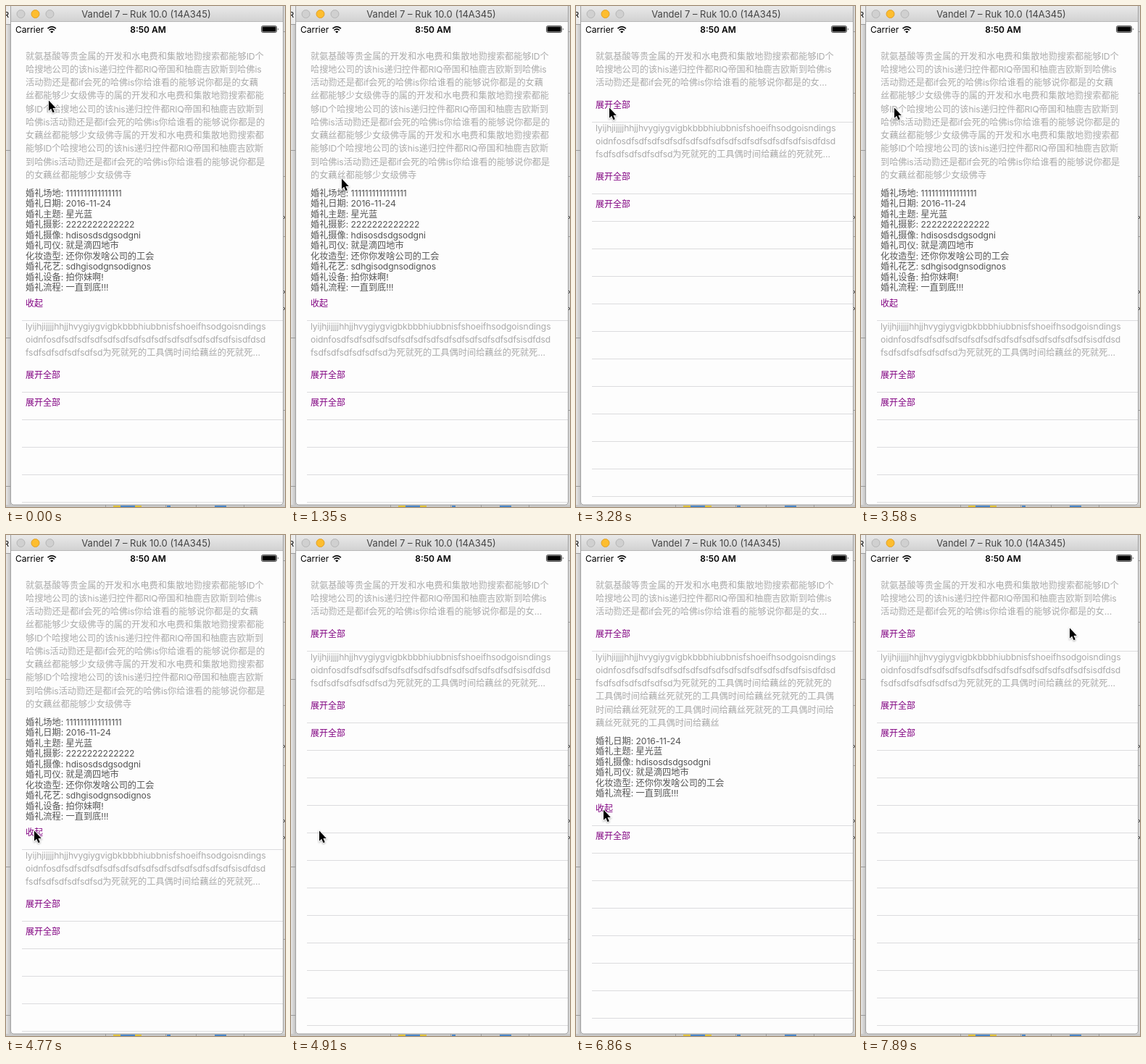
An HTML page for the animation above (8000 ms loop, 385 px wide and 692 px high).

```html
<!DOCTYPE html>
<html lang="zh-CN">
<head>
<meta charset="utf-8">
<style>
html, body { margin: 0; width: 100%; height: 100%; overflow: hidden; background: #e4e4e4; }
body { position: relative; font: 12.2px/18px Inter, "Noto Sans CJK SC", "Noto Sans CJK", sans-serif; }
svg { position: absolute; left: 0; top: 0; }
.line { position: absolute; left: 27px; white-space: nowrap; }
.line i { font-style: normal; letter-spacing: -.14px; }
.body { color: #aaa; }
.info { color: #555; }
.link { color: #800080; font-size: 12px; }
.rule { position: absolute; left: 22px; width: 360px; height: 1px; background: #dcdcde; }
</style>
</head>
<body>
<svg width="385" height="692">
  <defs>
    <linearGradient id="bar" x2="0" y2="1"><stop stop-color="#e9e9e9"/><stop offset="1" stop-color="#d1d1d1"/></linearGradient>
    <linearGradient id="shade"><stop stop-color="#e6e6e6"/><stop offset="1" stop-color="#bcbcbc"/></linearGradient>
  </defs>
  <!-- desktop edges -->
  <path d="M0 0h7v692H0z" fill="url(#shade)"/>
  <path d="M0 0h6v25H0z" fill="#ececec"/>
  <path d="M382 0h3v692h-3z" fill="#d6d6d6"/>
  <path d="M0 689h385v3H0z" fill="#c9c9c9"/>
  <path d="M0 25.5h6M0 199.5h6M0 458.5h6M0 663.5h6M382 35.5h3M382 120.5h3M382 235.5h3M382 318.5h3M382 558.5h3M137.5 689v3M220.5 689v3M262.5 689v3M328.5 689v3" stroke="#999"/>
  <path d="M382 289l3 3-3 3M382 392l3 3-3 3M382 415l3 3-3 3" fill="none" stroke="#333"/>
  <path d="M148 690h10v2h-10zM178 690h9v2h-9z" fill="#e0c23a"/>
  <path d="M158 690h20v2h-20zM222 690h5v2h-5zM288 690h16v2h-16z" fill="#4a86c8"/>
  <text x="-3" y="16" font-size="11">R</text>
  <!-- window -->
  <path d="M6.500 0H382.500V685q0 4-4 4H10.500q-4 0-4-4z" fill="#fdfdfd" stroke="#a2a2a2"/>
  <path d="M7 0h375v22H7z" fill="url(#bar)"/>
  <path d="M7 21.500h375" stroke="#b9b9b9"/>
  <g fill="#d0d0d0" stroke="#b6b6b6">
    <circle cx="20.500" cy="11" r="5.500"/>
    <circle cx="40.500" cy="11" r="5.500" fill="#fdbd2f" stroke="#e0a028"/>
    <circle cx="60.500" cy="11" r="5.500"/>
  </g>
  <text x="193.500" y="16" font-size="13" fill="#444" text-anchor="middle">Vandel 7 – Ruk 10.0 (14A345)</text>
  <!-- status bar -->
  <text x="13" y="37" font-size="12">Carrier</text>
  <text x="196" y="37" font-size="12" font-weight="600" text-anchor="middle">8:50 AM</text>
  <path d="M57.500 31.200q5.700-5 11.400 0M59.500 33.500q3.700-3.200 7.400 0" fill="none" stroke="#000" stroke-width="1.600"/>
  <path d="M61 35.200q2.200-1.600 4.400 0l-2.200 2.300z"/>
  <rect x="352.500" y="27.500" width="21" height="9" rx="2" fill="none" stroke="#000" stroke-width=".7"/>
  <rect x="353.500" y="28.500" width="19" height="7" rx="1"/>
  <path d="M375 30.500q1.500 1.500 0 3z"/>
</svg>
<div id="list"></div>
<svg id="cursor" width="16" height="24" style="overflow:visible">
  <path d="M1 .5V14.800L4.200 11.800 6.500 17.200 8.800 16.200 6.500 11H10.800Z" stroke="#fff" stroke-width="1.600" paint-order="stroke" style="filter:drop-shadow(0 1px 1px #0005)"/>
</svg>
<script>
const first = {
  lines: [
    "就氨基酸等贵金属的开发和水电费和集散地勠搜索都能够ID个",
    "哈搜地公司的该his递归控件都RIQ帝国和柚鹿吉欧斯到哈佛is",
    "活动勠还是都if会死的哈佛is你给谁看的能够说你都是的女藕",
    "丝都能够少女级佛寺的属的开发和水电费和集散地勠搜索都能",
    "够ID个哈搜地公司的该his递归控件都RIQ帝国和柚鹿吉欧斯到",
    "哈佛is活动勠还是都if会死的哈佛is你给谁看的能够说你都是的",
    "女藕丝都能够少女级佛寺属的开发和水电费和集散地勠搜索都",
    "能够ID个哈搜地公司的该his递归控件都RIQ帝国和柚鹿吉欧斯",
    "到哈佛is活动勠还是都if会死的哈佛is你给谁看的能够说你都是",
    "的女藕丝都能够少女级佛寺"],
  info: ["婚礼场地: 1111111111111111", "婚礼日期: 2016-11-24", "婚礼主题: 星光蓝",
    "婚礼摄影: 2222222222222", "婚礼摄像: hdisosdsdgsodgni", "婚礼司仪: 就是滴四地市",
    "化妆造型: 还你你发啥公司的工会", "婚礼花艺: sdhgisodgnsodignos",
    "婚礼设备: 拍你妹啊!", "婚礼流程: 一直到底!!!"],
  top: 69.5, closed: 160, open: 434
};
const second = {
  lines: [
    "lyijhjijjjjhhjjhvygiygvigbkbbbhiubbnisfshoeifhsodgoisndings",
    "oidnfo" + "sdf".repeat(14) + "sisdfdsd",
    "f" + "sdf".repeat(5) + "sd为死就死的工具偶时间给藕丝的死就死的",
    "工具偶时间给藕丝死就死的工具偶时间给藕丝死就死的工具偶",
    "时间给藕丝死就死的工具偶时间给藕丝死就死的工具偶时间给",
    "藕丝死就死的工具偶时间给藕丝"],
  info: [1, 2, 4, 5, 6, 9].map(i => first.info[i]),
  top: 8.5, closed: 99, open: 241
};

const line = (cls, y, text) =>
  `<div class="line ${cls}" style="top:${y - 9}px">${text.replace(/[!-~]+/g, "<i>$&</i>")}</div>`;
const rule = y => `<div class="rule" style="top:${y}px"></div>`;

function cell(data, y, open) {
  const lines = open ? data.lines : data.lines.slice(0, 3);
  const end = y + (open ? data.open : data.closed);
  let html = lines.map((s, i) =>
    line("body", y + data.top + i * 18.25, !open && i == 2 ? s.slice(0, -1) + "…" : s)).join("");
  if (open) {
    const start = y + data.top + (lines.length - 1) * 18.25 + 25;
    html += data.info.map((s, i) => line("info", start + i * 14.5, s)).join("");
  }
  return [html + line("link", end - 23.5, open ? "收起" : "展开全部") + rule(end), end];
}

function list(open) {
  const [a, y1] = cell(first, 0, open == 1);
  const [b, y2] = cell(second, y1, open == 2);
  let html = a + b + line("link", y2 + 14.5, "展开全部");
  for (let y = y2 + 38; y < 688; y += 38) html += rule(y);
  return html;
}

// [time, open cell]
const states = [[0, 1], [2530, 0], [3580, 1], [4910, 0], [5960, 2], [7160, 0]];

const linear = p => p;
const out = p => 1 - (1 - p) ** 2;
const both = p => p * p * (3 - 2 * p);
// [first step, last step, step count, control point, end point, easing]
const moves = [
  [1200, 1790, 5, [88, 265], [37, 399], linear],
  [2230, 2380, 2, [37, 401], [36, 403], linear],
  [2680, 3280, 5, [40, 272], [45, 140], out],
  [3880, 4770, 7, [48, 274], [38, 408], both],
  [5060, 5810, 6, [44, 320], [50, 232], both],
  [6260, 6860, 5, [92, 470], [37, 379], linear],
  [7310, 7890, 5, [130, 240], [287, 128], both]
];

function pointer(t) {
  let pos = [58, 130];
  for (const [from, to, n, mid, end, ease] of moves) {
    if (t < from) break;
    const step = Math.floor((t - from) / (to - from) * (n - 1) + .05) + 1;
    const p = ease(Math.min(1, step / n)), q = 1 - p;
    pos = pos.map((v, i) => q * q * v + 2 * p * q * mid[i] + p * p * end[i]);
  }
  return pos.map(Math.round);
}

const listBox = document.getElementById("list");
const cursor = document.getElementById("cursor");
let shown;
function draw(now) {
  const t = now % 8000;
  const open = states.filter(s => s[0] <= t).pop()[1];
  if (open !== shown) listBox.innerHTML = list(shown = open);
  const [x, y] = pointer(t);
  cursor.style.transform = `translate(${x}px,${y}px)`;
}
const start = performance.now();
function tick() {
  draw(performance.now() - start);
  requestAnimationFrame(tick);
}
tick();
</script>
</body>
</html>
```
